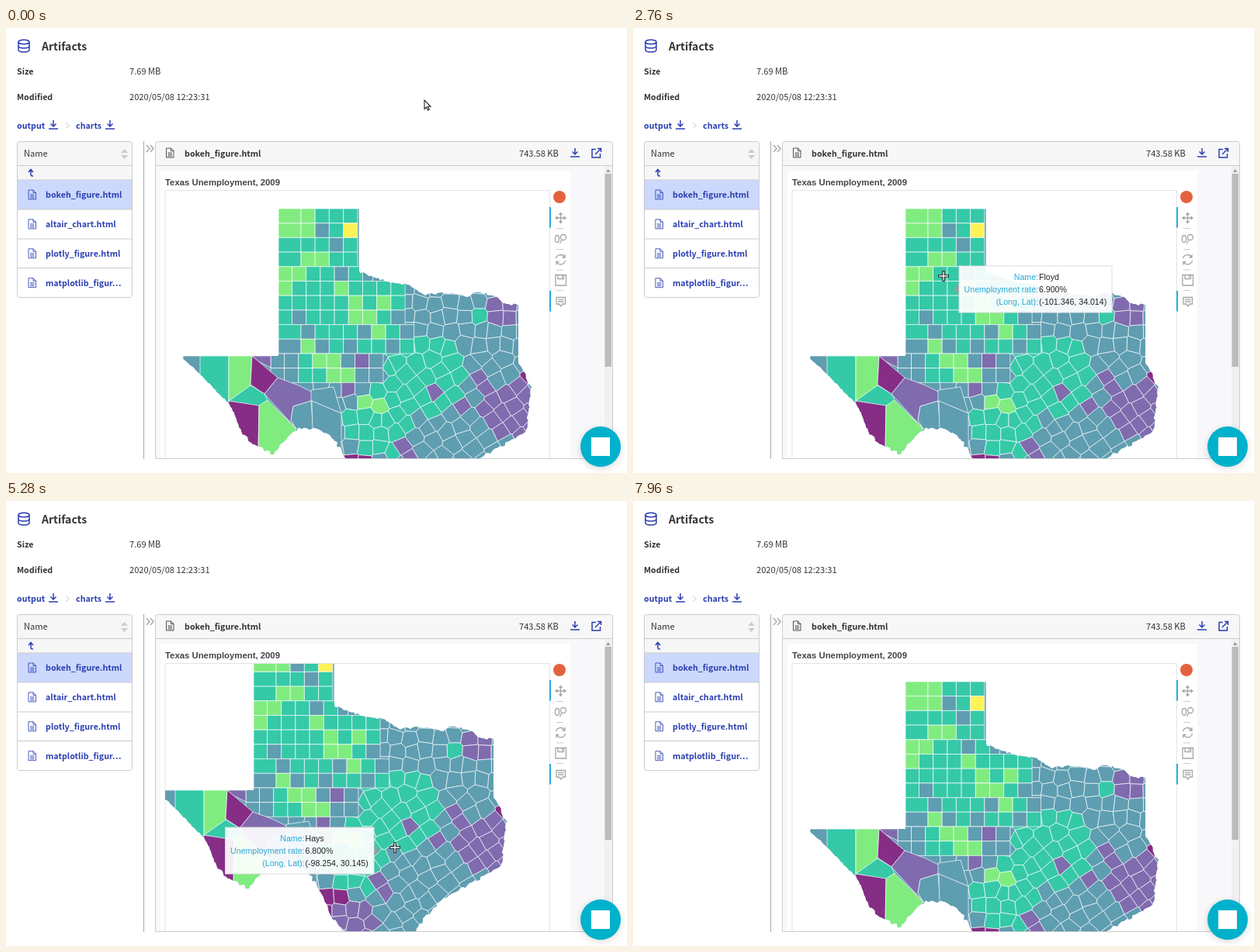
An HTML page that plays this animation: 800x574 px, repeating every 8 s.

```html
<!DOCTYPE html>
<html lang="en">
<head>
<meta charset="utf-8">
<title>Artifacts</title>
<style>
html, body { margin: 0; width: 100%; height: 100%; overflow: hidden; background: #fff; }
svg { display: block; width: 100vw; height: 100vh; }
text { font: 11.1px "Noto Sans CJK JP", "Noto Sans CJK SC", "Noto Sans", sans-serif; fill: #333; }
.bold, .link { font-size: 10.7px; font-weight: 700; fill: #333; }
.link { fill: #2a3eb1; }
.plot { font: bold 11.35px "Liberation Sans", Arial, sans-serif; fill: #444; }
.tip text { font: 10.6px "Liberation Sans", Arial, sans-serif; fill: #222; }
.tip .label { fill: #26a6d6; text-anchor: end; }
.blue { fill: none; stroke: #2a3eb1; stroke-width: 1.5; }
.gray { fill: none; stroke: #a1a6a9; stroke-width: 1.3; }
.edge { fill: none; stroke: #ccc; }
</style>
</head>
<body>
<svg viewBox="0 0 800 574" preserveAspectRatio="none">
  <defs>
    <clipPath id="frame"><rect x="205" y="210" width="495.5" height="345"/></clipPath>
    <clipPath id="state"><path id="outline"/></clipPath>
    <filter id="soft" x="-50%" y="-50%" width="200%" height="200%"><feGaussianBlur stdDeviation="5"/></filter>
    <g id="down" class="blue"><path d="M0-6V2M-3.5-1.5L0 2L3.5-1.5M-6 5H6"/></g>
    <g id="doc"><path d="M-4.5-6H1.5L5-2.5V6H-4.5ZM1.5-6V-2.5H5M-2.5 0H3M-2.5 2H3M-2.5 4H3" fill="none" stroke-width=".85"/></g>
  </defs>

  <g class="blue">
    <ellipse cx="23" cy="18" rx="7" ry="2.8"/>
    <path d="M16 18V28C16 32 30 32 30 28V18M16 23C16 27 30 27 30 23"/>
  </g>
  <text class="bold" x="46" y="28.5" style="font-size:14px">Artifacts</text>
  <text class="bold" x="14" y="60">Size</text><text x="159" y="60">7.69 MB</text>
  <text class="bold" x="14" y="93">Modified</text><text x="159" y="93">2020/05/08 12:23:31</text>
  <text class="link" x="14" y="129.5">output</text><use href="#down" x="61" y="125"/>
  <path d="M77 122.5L81.500 126L77 129.5" class="edge"/>
  <text class="link" x="90" y="129.5">charts</text><use href="#down" x="134" y="125"/>

  <rect x="14.5" y="147" width="148" height="49" fill="#f6f6f6"/>
  <rect x="14.5" y="196" width="148" height="38" fill="#ccd9fd"/>
  <path class="edge" d="M14.5 177.5H162.5M14.5 196H162.5M14.5 234H162.5M14.5 272H162.5M14.5 309.5H162.5"/>
  <rect class="edge" x="14.5" y="146.5" width="148" height="201" rx="3"/>
  <text x="23" y="165.5">Name</text>
  <path d="M148 161L152.5 156L157 161ZM148 164L152.5 169L157 164Z" fill="#ccc"/>
  <path class="blue" d="M29 186L32 182.5L35 186M32 183V189.5Q32 191 35 191"/>
  <g id="files"></g>

  <path d="M177.5 146V556" stroke="#aaa"/>
  <path class="gray" d="M181 151L185 155.5L181 160M186 151L190 155.5L186 160"/>

  <rect x="192" y="147" width="589" height="409" fill="#f8f8fa"/>
  <rect x="199" y="184" width="528" height="371.5" fill="#fff"/>
  <rect x="192" y="147" width="589" height="30.5" fill="#f7f7f7"/>
  <path class="edge" d="M192 177.5H781"/>
  <use href="#doc" x="211" y="161" stroke="#333"/>
  <text class="bold" x="230" y="165.5">bokeh_figure.html</text>
  <text x="661" y="165.5">743.58 KB</text>
  <use href="#down" x="733" y="161"/>
  <path class="blue" d="M760 156.5H755V167H765.5V162M762 155.5H766.5V160M766 156L759 163"/>
  <rect x="771" y="178" width="10" height="377" fill="#f1f1f1"/>
  <rect x="771.5" y="188" width="8.5" height="249" fill="#bcbcbc"/>
  <path d="M773 186L775.7 182L778.5 186Z" fill="#999"/>

  <text class="plot" x="205" y="202.5">Texas Unemployment, 2009</text>
  <path d="M205 555V209.5H700.5V555" fill="none" stroke="#e3e3e3"/>
  <g clip-path="url(#frame)"><g id="map"><g id="counties" clip-path="url(#state)" stroke="#fff" stroke-width=".8" stroke-opacity=".85" stroke-linejoin="round"></g></g></g>

  <circle cx="713" cy="218" r="8" fill="#e4633f"/>
  <path d="M700 231H702V257.5H700ZM700 339H702V365.5H700Z" fill="#26aae1"/>
  <path class="edge" d="M709 258.5H718M709 285.5H718M709 312H718M709 338.5H718"/>
  <g class="gray">
    <path d="M714.5 239V251M708.5 245H720.5M712.5 241L714.5 238.5L716.5 241M712.5 249L714.5 251.5L716.5 249M710.5 243L708 245L710.5 247M718.5 243L721 245L718.5 247"/>
    <ellipse cx="710" cy="272" rx="2.6" ry="4.5"/><circle cx="718" cy="270" r="3.5"/><path d="M716 273L713.5 278"/>
    <path d="M708.5 297A6 6 0 0 1 719.5 295.5M720.5 300A6 6 0 0 1 709.5 302M720 292V296H716.5M709 305.5V301.5H712.5"/>
    <path d="M708 318.5H721.5V332H708ZM711 318.5V323.5H718.5V318.5M716.5 319V322"/>
    <path d="M709 347.5H720.5V356H717L714.7 359L712.5 356H709ZM711 350.3H718.5M711 353H718.5"/>
  </g>
  <path class="edge" d="M192.5 555.5H781.5V149.5Q781.5 146.5 778.5 146.5H195.5Q192.5 146.5 192.5 149.5Z"/>

  <g class="tip" id="tip">
    <path id="arrow" fill="#999" fill-opacity=".75"/>
    <rect id="box" height="60" fill="#fff" fill-opacity=".92" stroke="#dedede"/>
    <g id="rows">
      <text class="label" y="-12">Name:</text><text x="1" y="-12"></text>
      <text class="label" y="4">Unemployment rate:</text><text x="1" y="4"></text>
      <text class="label" y="20">(Long, Lat):</text><text x="1" y="20"></text>
    </g>
  </g>

  <circle cx="766" cy="542" r="26" opacity=".15" filter="url(#soft)"/>
  <circle cx="766" cy="540" r="26" fill="#00b1cb"/>
  <rect x="754" y="528" width="24" height="24" fill="#fff"/>

  <g id="pointer"><path d="M0 0V11.5L2.7 9L4.5 13L6.3 12.2L4.5 8.3H8Z" fill="#fff" stroke="#222" stroke-width="1.1"/></g>
  <g id="cross"><path d="M0-7V7M-7 0H7" stroke="#222" stroke-width="3.4"/><path d="M0-6V6M-6 0H6" stroke="#fff" stroke-width="1.3"/></g>
</svg>
<script>
const $ = id => document.getElementById(id);
const NS = 'http://www.w3.org/2000/svg';

['bokeh_figure.html', 'altair_chart.html', 'plotly_figure.html', 'matplotlib_figur…'].forEach((name, i) => {
  const y = 215 + i * 37.9;
  $('files').insertAdjacentHTML('beforeend',
    `<use href="#doc" x="33.5" y="${y}" stroke="#2a3eb1"/><text class="link" x="51" y="${y + 4}">${name}</text>`);
});

// ---- Map ----
const FILL = { y: '#fdf258', g: '#80ec80', t: '#35c9a8', b: '#5f9db1', p: '#7f6bae', m: '#862d86' };
let seed = 7;
const rnd = () => (seed = seed * 16807 % 2147483647) / 2147483647 - .5;
const pairs = s => s.split(' ').map(p => p.split(',').map(Number));
const toPath = pts => 'M' + pts.map(p => p.map(v => v.toFixed(1)).join(' ')).join('L') + 'Z';

function addCell(pts, kind) {
  const el = document.createElementNS(NS, 'path');
  el.setAttribute('d', toPath(pts));
  el.setAttribute('fill', FILL[kind]);
  $('counties').append(el);
}

// Rivers and coast get small bends; straight borders stay straight.
function roughen(pts) {
  return pts.flatMap((a, i) => {
    const b = pts[(i + 1) % pts.length], dx = b[0] - a[0], dy = b[1] - a[1];
    if (!dx || !dy) return [a];
    const n = Math.max(1, Math.round(Math.hypot(dx, dy) / 3.5));
    return Array.from({ length: n }, (_, k) => k
      ? [a[0] + dx * k / n + rnd() * 3, a[1] + dy * k / n + rnd() * 4] : a);
  });
}

const border = pairs('351,233 455,233 455,314 473,321 488,327 517,331 540,345 556,342 585,344 595,347 604,341 ' +
  '618,342 647,356 660,357 660,432 677,463 673,496 669,521 632,542 588,568 557,607 545,622 553,682 486,657 ' +
  '472,611 450,584 433,547 422,530 404,518 377,515 368,522 345,550 318,537 303,520 287,484 250,447 228,427 228,423 351,423');
$('outline').setAttribute('d', toPath(roughen(border)));
addCell(border, 'b');

// Irregular counties: two jittered lattices cut into nearest-centre cells; round zones give the fill.
const zones = [
  ['m', 450, 561, 20], ['m', 669, 449, 11], ['g', 476, 486, 17], ['p', 650, 496, 38], ['p', 613, 455, 11],
  ['p', 593, 487, 10], ['p', 560, 474, 10], ['p', 642, 365, 20], ['p', 437, 470, 12], ['p', 515, 548, 12],
  ['p', 482, 592, 32], ['t', 610, 373, 10], ['t', 640, 441, 10], ['t', 540, 448, 56], ['t', 485, 505, 46]
];
const kindAt = (x, y) => (zones.find(([, zx, zy, r]) => Math.hypot(x - zx, y - zy) < r) || 'b')[0];

const STEP = 18.6;
const tilted = (x, y) => x > 488 && y > 424;
function lattice(angle, keep) {
  const out = [], c = Math.cos(angle), s = Math.sin(angle);
  for (let i = -20; i <= 20; i++) for (let j = -20; j <= 20; j++) {
    const x = 536 + (i * c - j * s) * STEP, y = 410 + (i * s + j * c) * STEP;
    const onMap = x > 385 && x < 690 && y > 325 && y < 690;
    if (onMap && keep(x, y)) out.push({ x: x + rnd() * 7, y: y + rnd() * 7 });
  }
  return out;
}
const centres = [...lattice(0, (x, y) => !tilted(x, y)), ...lattice(-.6, tilted)];

function cutCell(c) {
  let pts = [[-24, -24], [24, -24], [24, 24], [-24, 24]].map(([x, y]) => [c.x + x, c.y + y]);
  for (const o of centres) {
    const dx = o.x - c.x, dy = o.y - c.y;
    if (o === c || Math.hypot(dx, dy) > 70) continue;
    const side = ([x, y]) => (x - c.x - dx / 2) * dx + (y - c.y - dy / 2) * dy;
    pts = pts.flatMap((a, i) => {
      const b = pts[(i + 1) % pts.length], s = side(a), e = side(b), out = s <= 0 ? [a] : [];
      if (s * e < 0) {
        const k = s / (s - e);
        out.push([a[0] + (b[0] - a[0]) * k, a[1] + (b[1] - a[1]) * k]);
      }
      return out;
    });
  }
  return pts;
}
centres.forEach(c => addCell(cutCell(c), kindAt(c.x, c.y)));

// Square counties, row by row; some rows begin with a wide one.
'ggttt ggbty tttbt tggtt ggttbt gtttgtttt tttttgtgt tbtttggtb tbtttbgtb bgbtbttbt bbtggbpb bbttggbb'
  .split(' ').forEach((kinds, row) => {
    const wide = row < 4 || row === 8 || row === 9;
    const left = row < 10 ? 351 : 341, first = wide ? 29 : 17.5;
    const top = 233 + row * 18.7, bottom = top + 18.7;
    [...kinds].forEach((kind, i) => {
      const a = i ? left + first + (i - 1) * 18.2 : left, b = left + first + i * 18.2;
      addCell([[a, top], [b, top], [b, bottom], [a, bottom]], kind);
    });
  });

// Large western counties.
Object.entries({
  '250,423 287,423 287,490 250,460': 't',
  '287,423 317,423 315,462 287,481': 'g',
  '317,423 341,423 341,438 325,430': 'p',
  '317,423 350,451 333,472 315,460': 'm',
  '315,461 333,472 337,480 326,488 287,481': 't',
  '287,481 326,487 325,545 280,545': 'm',
  '326,487 337,480 374,517 350,556 325,545': 'g',
  '350,451 377,461 395,470 393,481 370,488 367,506 374,517 333,472': 'p',
  '370,488 393,481 396,520 374,517 367,506': 'b',
  '393,467 422,463 432,497 393,481': 'b',
  '394,481 432,497 432,546 395,520': 'b'
}).forEach(([pts, kind]) => addCell(pairs(pts), kind));

// ---- Motion ----
const cursor = [
  [0, 539, 93], [560, 482, 485], [1100, 380, 338], [1200, 385, 339], [1800, 448, 440], [2200, 446, 500],
  [2660, 412, 337], [2760, 400, 320], [3320, 407, 268], [3580, 512, 387], [3680, 531, 349], [4960, 375, 218],
  [5180, 482, 451], [5280, 501, 447], [5880, 724, 308], [6880, 710, 300], [7120, 712, 299], [7560, 812, 420]
];
const GRAB = 3320, DROP = 4960, RESET = 7080, LAG = 100;

// Time, longitude, latitude, name, rate.
const hints = [
  [320, -98.9, 33.6, 'Young', '6.500%'],
  [1080, -102.291, 33.993, 'Lamb', '6.600%'],
  [1240, -102.291, 33.993, 'Coke', '7.600%'],
  [2200, -100.5, 30.5, 'Sutton', '6.600%'],
  [2720, -101.346, 34.014, 'Floyd', '6.900%'],
  [2840, -101.346, 34.014, 'Donley', '7%'],
  [3680, -100.886, 34.945, 'Donley', '7%'],
  [5240, -98.254, 30.145, 'Hays', '6.800%'],
  [5320, -98.254, 30.145, 'Milam', '9.600%'],
  [5600, -95.3, 31.4, 'Milam', '9.600%']
];

function at(keys, t) {
  let i = keys.length - 1;
  while (i && keys[i][0] > t) i--;
  const a = keys[i], b = keys[i + 1] || a;
  const k = b === a ? 0 : (t - a[0]) / (b[0] - a[0]), e = (k + k * k * (3 - 2 * k)) / 2;
  return a.map((v, j) => typeof v === 'number' ? v + (b[j] - v) * e : v);
}
const move = (el, x, y) => el.setAttribute('transform', `translate(${x.toFixed(1)} ${y.toFixed(1)})`);
const show = (el, on) => el.style.display = on ? '' : 'none';
const values = [...document.querySelectorAll('#rows text:not(.label)')];

// While dragging, the map follows the cursor.
function panAt(t) {
  if (t < GRAB || t >= RESET) return [0, 0];
  const [, x0, y0] = at(cursor, GRAB), [, x, y] = at(cursor, Math.min(t, DROP));
  return [x - x0, y - y0];
}

function drawTip(t) {
  const on = t >= 320 && t < 5600;
  show($('tip'), on);
  if (!on) return;
  const [, x, y] = at(cursor, t - LAG), [, lon, lat, name, rate] = at(hints, t);
  const coords = `(${lon.toFixed(3)}, ${lat.toFixed(3)})`;
  [name, rate, coords].forEach((s, i) => values[i].textContent = s);
  const w = 197 - (18 - coords.length) * 5.5, right = x < 453;
  const base = x + (right ? 8 : -8), left = right ? base : base - w;
  $('box').setAttribute('x', left.toFixed(1));
  $('box').setAttribute('y', (y - 30).toFixed(1));
  $('box').setAttribute('width', w);
  $('arrow').setAttribute('d', `M${x} ${y}L${base} ${y - 7}V${y + 7}Z`);
  move($('rows'), left + 102, y);
}

function draw(now) {
  const t = Math.floor(now % 8000 / 40) * 40;
  const [, x, y] = at(cursor, t);
  const inside = x > 205 && x < 700 && y > 210 && y < 555;
  move($('map'), ...panAt(t));
  move($('pointer'), x, y);
  move($('cross'), x, y);
  show($('pointer'), !inside && t < 7560);
  show($('cross'), inside);
  drawTip(t);
}

let start;
function loop(now) {
  start ??= now;
  draw(now - start);
  requestAnimationFrame(loop);
}
draw(0);
requestAnimationFrame(loop);
</script>
</body>
</html>
```
